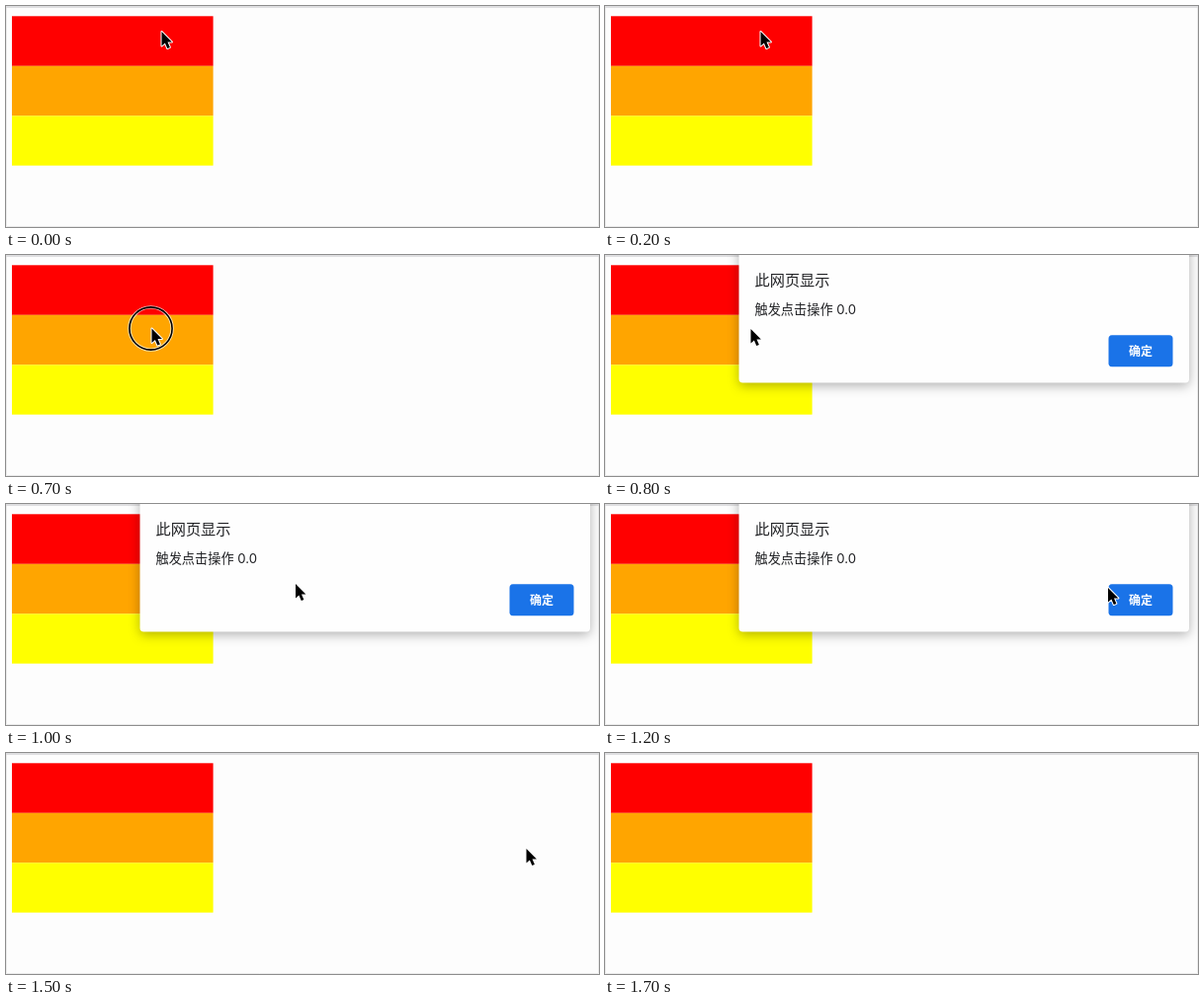
An HTML page that plays this animation: 600x224 px, repeating every 1.8 s.

```html
<!DOCTYPE html>
<html lang="zh">
<head>
<meta charset="utf-8">
<title>Click demo</title>
<style>
  html, body { margin: 0; width: 100%; height: 100%; overflow: hidden; background: #fdfdfd; }
  svg { display: block; width: 600px; height: 224px; }
  text { font-family: Inter, "Noto Sans CJK SC", "Noto Sans CJK", sans-serif; fill: #202124; }
  #dialog { filter: drop-shadow(0 3px 6px rgba(0, 0, 0, .3)); }
</style>
</head>
<body>
<svg viewBox="0 0 600 224">
  <rect width="600" height="224" fill="#fdfdfd"/>
  <path d="M0 1H600" stroke="#d6d6d8" stroke-width="1.4"/>
  <path d="M.5 2V223.5H599.5V2" fill="none" stroke="#ececec"/>
  <rect x="6" y="10.3" width="203.6" height="50.5" fill="#f00"/>
  <rect x="6" y="60.8" width="203.6" height="50.5" fill="#ffa500"/>
  <rect x="6" y="111.3" width="203.6" height="50.4" fill="#ff0"/>

  <g id="popup">
    <rect id="dialog" x="135.5" y="-10" width="455.5" height="139.5" rx="4" fill="#fefefe"/>
    <text x="151.5" y="30.5" font-size="15.2">此网页显示</text>
    <text x="151.5" y="60" font-size="13.2">触发点击操作 0.0</text>
    <rect id="button" x="509.5" y="81.3" width="65" height="32" rx="3.5"/>
    <text id="label" x="542" y="101.7" font-size="12" font-weight="700" text-anchor="middle">确定</text>
  </g>

  <g id="pointer">
    <g id="ring" fill="none">
      <circle cx="-1" r="21.6" stroke="#fff" stroke-opacity=".7" stroke-width="3.4"/>
      <circle cx="-1" r="21.6" stroke="#000" stroke-width="1.6"/>
    </g>
    <path d="M0 0V14.6L3.4 11.5L5.8 17L8.4 15.9L6 10.5H10.4Z" fill="#000" stroke="#fff"
      stroke-width="2" stroke-linejoin="round" paint-order="stroke"/>
  </g>
</svg>
<script>
  const LOOP = 1800, STEP = 100;
  const el = id => document.getElementById(id);
  const [popup, button, label, pointer, ring] =
    ["popup", "button", "label", "pointer", "ring"].map(el);

  // Pointer path: time, x, y
  const path = [
    [0, 157.5, 26], [300, 157.5, 26], [400, 147.5, 57], [600, 147.5, 74],
    [800, 147.5, 75], [900, 185, 79], [1200, 509, 85], [1300, 526, 96],
    [1400, 527, 97], [1500, 526.5, 97], [1600, 526.5, 123]
  ];
  const clicks = [100, 700, 1400];

  function place(t) {
    const i = path.findIndex(p => p[0] >= t);
    if (i <= 0) return path[0].slice(1);
    const [t0, x0, y0] = path[i - 1], [t1, x1, y1] = path[i];
    const k = (t - t0) / (t1 - t0);
    return [x0 + (x1 - x0) * k, y0 + (y1 - y0) * k];
  }

  const show = (node, on) => node.setAttribute("visibility", on ? "visible" : "hidden");

  function draw(time) {
    const t = Math.floor((time % LOOP) / STEP) * STEP;
    const pressed = t === 1400;
    popup.style.display = t >= 800 && t < 1500 ? "" : "none";
    button.style.fill = pressed ? "#4a84d6" : "#1a73e8";
    label.style.fill = pressed ? "#d5e2f6" : "#fff";
    pointer.setAttribute("transform", `translate(${place(t)})`);
    pointer.style.display = t < 1700 ? "" : "none";
    show(ring, clicks.includes(t));
  }

  const start = performance.now();
  function tick() {
    draw(performance.now() - start);
    requestAnimationFrame(tick);
  }
  draw(0);
  requestAnimationFrame(tick);
</script>
</body>
</html>
```
